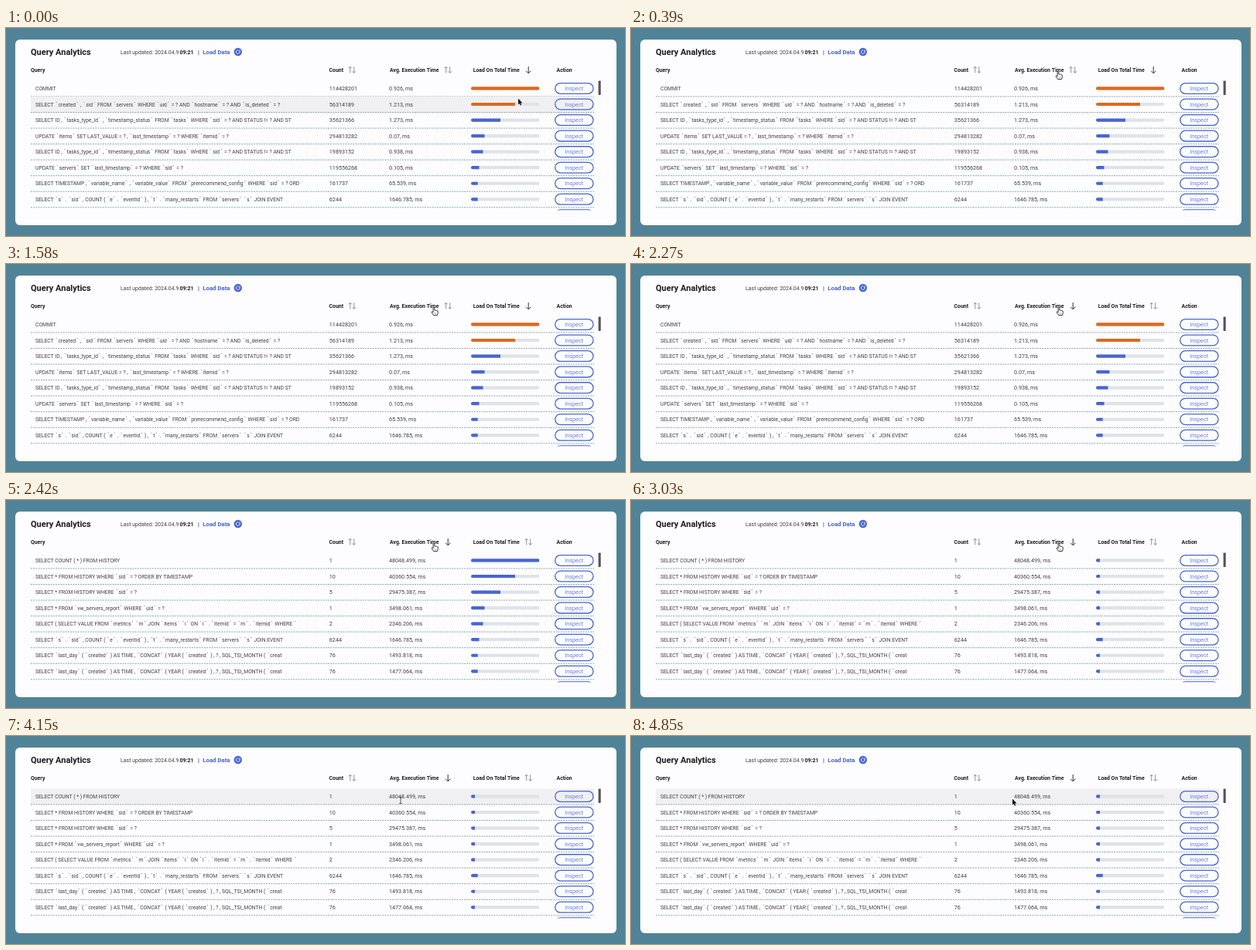
Write an HTML page with a canvas that moves like this. It is 800 by 270 pixels and loops after 4.88 s.

```html
<!DOCTYPE html>
<html lang="en">
<head>
<meta charset="utf-8">
<title>Query Analytics</title>
<style>
html, body { margin: 0; width: 100%; height: 100%; overflow: hidden; background: #508397; }
canvas { display: block; width: 800px; height: 270px; }
</style>
</head>
<body>
<canvas id="stage"></canvas>
<script>
const LOOP = 4880, ICON_AT = 2240, DATA_AT = 2400, BARS_END = 2690;
const TOP = 68.4, PITCH = 20.55;
const BLUE = '#4766d2', ORANGE = '#dc6a1e', INK = '#403f46', DARK = '#1d1c22';
const FONT = 'px Roboto, "Noto Sans", sans-serif';

const TASKS = 'SELECT ID , `tasks_type_id` , `timestamp_status` FROM `tasks` WHERE `sid` = ? AND STATUS != ? AND ST';
const EVENTS = 'SELECT `s` . `sid` , COUNT ( `e` . `eventid` ) , `t` . `many_restarts` FROM `servers` `s` JOIN EVENT';
const LAST_DAY = 'SELECT `last_day` ( `created` ) AS TIME , `CONCAT` ( YEAR ( `created` ) , ? , SQL_TSI_MONTH ( `creat';

// query, count, average time, bar width
const byLoad = [
  ['COMMIT', '114428201', '0.926', 88.5],
  ['SELECT `created` , `sid` FROM `servers` WHERE `uid` = ? AND `hostname` = ? AND `is_deleted` = ?', '56314189', '1.213', 57],
  [TASKS, '35621366', '1.273', 38],
  ['UPDATE `items` SET LAST_VALUE = ? , `last_timestamp` = ? WHERE `itemid` = ?', '294813282', '0.07', 17.5],
  [TASKS, '19893152', '0.938', 15.5],
  ['UPDATE `servers` SET `last_timestamp` = ? WHERE `sid` = ?', '119556268', '0.105', 10.5],
  ['SELECT TIMESTAMP , `variable_name` , `variable_value` FROM `prerecommend_config` WHERE `sid` = ? ORD', '161737', '65.539', 8.7],
  [EVENTS, '6244', '1646.785', 8.7]
];
const byTime = [
  ['SELECT COUNT ( * ) FROM HISTORY', '1', '48048.499', 5],
  ['SELECT * FROM HISTORY WHERE `sid` = ? ORDER BY TIMESTAMP', '10', '40360.554', 5],
  ['SELECT * FROM HISTORY WHERE `sid` = ?', '5', '29475.387', 5],
  ['SELECT * FROM `vw_servers_report` WHERE `uid` = ?', '1', '3498.061', 5],
  ['SELECT ( SELECT VALUE FROM `metrics` `m` JOIN `items` `i` ON `i` . `itemid` = `m` . `itemid` WHERE `', '2', '2346.206', 5],
  [EVENTS, '6244', '1646.785', 8.7],
  [LAST_DAY, '76', '1493.818', 5],
  [LAST_DAY, '76', '1477.064', 5]
];

// pointer path: time, x, y
const path = [
  [0, 662, 91.5], [30, 662, 91.5], [380, 552, 56.3], [550, 553, 56.3], [3320, 553, 56.3],
  [3850, 517.5, 80.5], [3910, 518, 81], [4050, 518, 81], [4150, 510, 83.5],
  [4480, 492, 79.6], [4690, 492, 79.6], [4850, 493, 81.6], [LOOP, 493, 81.6]
];

const canvas = document.getElementById('stage');
const ctx = canvas.getContext('2d');
const dpr = window.devicePixelRatio || 1;
canvas.width = 800 * dpr;
canvas.height = 270 * dpr;

const ease = u => u * u * (3 - 2 * u);
const clamp01 = u => Math.max(0, Math.min(1, u));

function text(str, x, y, size, color = INK, weight = 400, align = 'left') {
  ctx.font = weight + ' ' + size + FONT;
  ctx.fillStyle = color;
  ctx.textAlign = align;
  ctx.fillText(str, x, y);
}

// SQL text with backticks set in wide cells
function sql(str, x, y) {
  const size = 6.75, cell = 4.2;
  for (const part of str.split(/(`)/)) {
    if (part === '`') {
      text(part, x + cell / 2, y, size, INK, 400, 'center');
      x += cell;
    } else if (part) {
      text(part, x, y, size);
      x += ctx.measureText(part).width;
    }
  }
}

function box(x, y, w, h, r) {
  ctx.beginPath();
  ctx.roundRect(x, y, w, h, r);
}

function line(points, color, width) {
  ctx.beginPath();
  points.forEach(([x, y], i) => i ? ctx.lineTo(x, y) : ctx.moveTo(x, y));
  ctx.strokeStyle = color;
  ctx.lineWidth = width;
  ctx.stroke();
}

function arrow(x, from, to, head, color, width) {
  const back = to + Math.sign(from - to) * head;
  line([[x, from], [x, to]], color, width);
  line([[x - head, back], [x, to], [x + head, back]], color, width);
}

function sortIcon(x, active) {
  if (active) {
    arrow(x, 50, 58.8, 3.1, '#333238', 1);
  } else {
    arrow(x - 2.5, 58.3, 50.2, 2.1, '#77767d', 0.8);
    arrow(x + 2.5, 50.2, 58.3, 2.1, '#77767d', 0.8);
  }
}

function refreshIcon(x, y) {
  ctx.fillStyle = BLUE;
  ctx.beginPath();
  ctx.arc(x, y, 5.2, 0, 7);
  ctx.fill();
  ctx.strokeStyle = '#fff';
  ctx.lineWidth = 0.8;
  ctx.beginPath();
  ctx.arc(x, y, 2.4, -0.4, 4.9);
  ctx.stroke();
  line([[x + 0.9, y - 1.1], [x + 2.5, y - 1], [x + 2.5, y - 2.6]], '#fff', 0.7);
}

function header(sorted) {
  text('Query Analytics', 32, 35, 11, DARK, 700);
  text('Last updated: 2024.04.9', 148, 33.6, 7);
  text('09:21', 224.5, 33.6, 7, DARK, 700);
  text('|', 248, 33.6, 7.4, '#2d3f80', 700);
  text('Load Data', 254.3, 33.7, 7.8, BLUE, 700);
  refreshIcon(299.8, 31);
  const heads = [['Query', 32], ['Count', 417.5], ['Avg. Execution Time', 496], ['Load On Total Time', 603.7], ['Action', 711.5]];
  for (const [label, x] of heads) text(label, x, 57, 6.9, DARK, 700);
  sortIcon(447.3, false);
  sortIcon(571.2, sorted);
  sortIcon(675.2, !sorted);
}

function bar(y, width, color) {
  ctx.save();
  box(601, y - 2.1, 88.5, 4.2, 2.1);
  ctx.clip();
  ctx.fillStyle = '#dfe3e8';
  ctx.fillRect(601, y - 3, 88.5, 6);
  ctx.fillStyle = color;
  ctx.fillRect(601, y - 3, width, 6);
  ctx.restore();
}

function button(y) {
  box(709.7, y - 6.9, 49.3, 13.8, 6.9);
  ctx.strokeStyle = BLUE;
  ctx.lineWidth = 1.3;
  ctx.stroke();
  text('Inspect', 734.2, y + 2.5, 7.3, '#6a82da', 400, 'center');
}

function table(t, hover) {
  const loaded = t >= DATA_AT;
  const rows = loaded ? byTime : byLoad;
  const shift = ease(clamp01((t - DATA_AT - 30) / (BARS_END - DATA_AT - 30)));
  ctx.save();
  ctx.beginPath();
  ctx.rect(30, 60, 732, 176.4);
  ctx.clip();
  rows.forEach(([query, count, avg], i) => {
    const top = TOP + i * PITCH, y = top + 10.05;
    if (i === hover) {
      ctx.fillStyle = '#f0eff1';
      ctx.fillRect(32, top, 728, PITCH);
    }
    sql(query, 38, y + 2.5);
    text(count, 417.8, y + 2.5, 7.2);
    text(avg + ', ms', 495, y + 2.5, 7.15);
    const from = byLoad[i][3], to = byTime[i][3];
    bar(y, from + (to - from) * shift, !loaded && i < 2 ? ORANGE : BLUE);
    button(y);
    ctx.setLineDash([2, 1.2]);
    line([[32, top + PITCH], [760, top + PITCH]], '#7f9ca6', 0.9);
    ctx.setLineDash([]);
  });
  button(TOP + 8 * PITCH + 10.05);
  ctx.restore();
  ctx.fillStyle = '#55525a';
  box(765.6, 68.5, 3.1, 18.5, 0.8);
  ctx.fill();
}

function pointerAt(t) {
  let i = 1;
  while (i < path.length - 1 && t > path[i][0]) i++;
  const [t0, x0, y0] = path[i - 1], [t1, x1, y1] = path[i];
  const u = ease(clamp01((t - t0) / (t1 - t0)));
  return [x0 + (x1 - x0) * u, y0 + (y1 - y0) * u];
}

const ARROW = new Path2D('M0 0V8.1L1.8 6.5L3 9.2L4.3 8.6L3.1 5.9H5.6Z');
const HAND = new Path2D('M-.9 .8Q-.9 0 0 0Q.9 0 .9 .8V3.8Q2 3.2 2.5 4.1Q3.6 3.6 4 4.5Q5.3 4.2 5.3 5.5V7.4L4.4 10.3H-.3L-2.7 6.8Q-3.2 5.8 -2.3 5.6Q-1.6 5.5 -.9 6.5Z');

function pointer(x, y) {
  ctx.save();
  ctx.translate(x, y);
  ctx.lineJoin = 'round';
  if (y < TOP) {
    ctx.fillStyle = '#fff';
    ctx.fill(HAND);
    ctx.strokeStyle = '#222';
    ctx.lineWidth = 0.9;
    ctx.stroke(HAND);
    line([[1, 7], [1, 9]], '#444', 0.5);
    line([[2.6, 7], [2.6, 9]], '#444', 0.5);
  } else if (x > 495 && x < 542) {
    line([[-1.9, -4.4], [0, -3.7], [1.9, -4.4]], '#333', 0.8);
    line([[0, -3.7], [0, 3.7]], '#333', 0.8);
    line([[-1.9, 4.4], [0, 3.7], [1.9, 4.4]], '#333', 0.8);
  } else {
    ctx.strokeStyle = '#fff';
    ctx.lineWidth = 1.4;
    ctx.stroke(ARROW);
    ctx.fillStyle = '#111';
    ctx.fill(ARROW);
  }
  ctx.restore();
}

function draw(t) {
  ctx.setTransform(dpr, 0, 0, dpr, 0, 0);
  ctx.fillStyle = '#508397';
  ctx.fillRect(0, 0, 800, 270);
  ctx.fillStyle = '#fdfcfe';
  box(12, 15, 777, 241, 6);
  ctx.fill();
  const [x, y] = pointerAt(t);
  header(t >= ICON_AT);
  table(t, Math.floor((y - TOP) / PITCH));
  pointer(x, y);
}

const start = performance.now();
function tick() {
  draw((performance.now() - start) % LOOP);
  requestAnimationFrame(tick);
}
tick();
</script>
</body>
</html>
```
